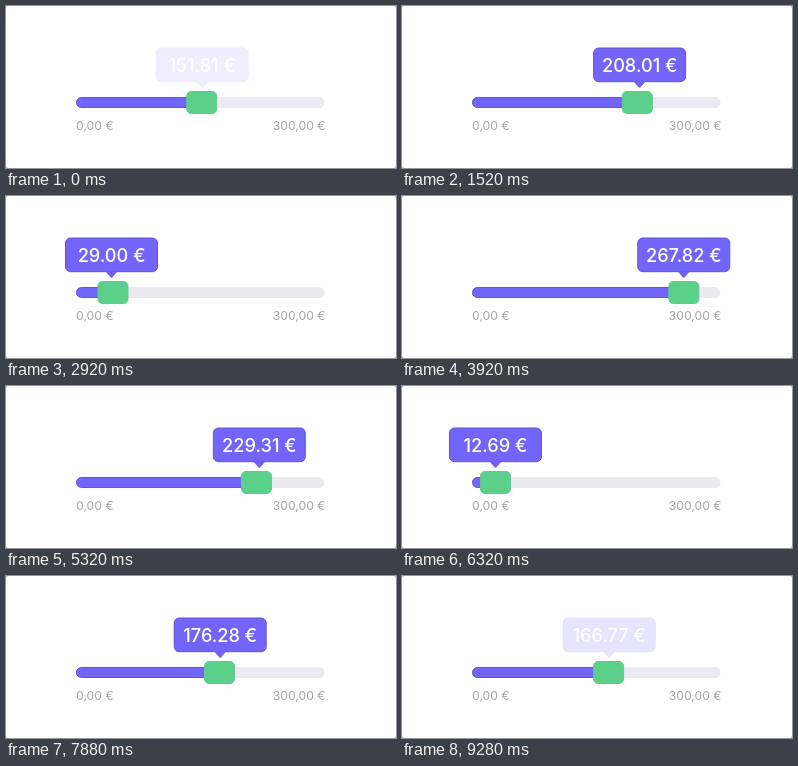
An HTML page that plays this animation: 390x162 px, repeating every 9.32 s.

```html
<!DOCTYPE html>
<html lang="en">
<head>
<meta charset="utf-8">
<title>Price slider</title>
<style>
  html, body { margin: 0; width: 100%; height: 100%; overflow: hidden; background: #999; }
  svg { display: block; width: 390px; height: 162px; background: #fff; border-radius: 2px; }
  text { font-family: Inter, sans-serif; }
  .label { font-size: 12.2px; fill: #a6a6aa; }
  .value { font-size: 18.2px; font-weight: 500; fill: #fff; text-anchor: middle; }
</style>
</head>
<body>
<svg viewBox="0 0 390 162">
  <rect x="70" y="91" width="248.5" height="11" rx="5.5" fill="#ebeaf1"/>
  <rect id="fill" x="70.5" y="91.5" height="10" rx="5" fill="#7365fa" stroke="#6155d0"/>
  <text class="label" x="70" y="124">0,00 €</text>
  <text class="label" x="319.5" y="124" text-anchor="end">300,00 €</text>
  <rect id="thumb" x="-15" y="85.5" width="30" height="22" rx="4.5" fill="#5bd08b" stroke="#68c690"/>
  <g id="bubble">
    <rect x="-46" y="42" width="92" height="33.7" rx="5" fill="#7365fa" stroke="#6257c6"/>
    <path d="M-6 75.5L-1 81.3Q0 82.4 1 81.3L6 75.5Z" fill="#7062ee"/>
    <text id="value" class="value" x="0" y="65.7"></text>
  </g>
</svg>
<script>
const LOOP = 9320, STEP = 300 / 662, START = 151.81;
const [fill, thumb, bubble, value] =
  ['fill', 'thumb', 'bubble', 'value'].map(id => document.getElementById(id));

// The slider is dragged from one resting value to the next
const drags = [
  { from: 500, to: 1110, value: 237.5 },
  { from: 1110, to: 2800, value: 24 },
  { from: 2800, to: 4240, value: 300 },
  { from: 4732, to: 6560, value: 0 },
  { from: 6880, to: 7880, value: 176.28 },
  { from: 7900, to: 8400, value: 151.81 },
  { from: 8400, to: 8930, value: 166.77 }
];

const ramp = (t, from, to) => Math.min(1, Math.max(0, (t - from) / (to - from)));
const ease = u => (1 - Math.cos(Math.PI * u)) / 2;

function valueAt(t) {
  const v = drags.reduce((v, d) => v + (d.value - v) * ease(ramp(t, d.from, d.to)), START);
  return Math.round(v / STEP) * STEP;
}

function draw(now) {
  const t = now % LOOP, v = valueAt(t);
  // The thumb runs slightly ahead of its bubble
  const thumbX = 85.2 + 0.728 * valueAt(t + 12);
  const alpha = 0.1 + 0.9 * (ramp(t, 440, 680) - ramp(t, 9000, 9304));
  fill.setAttribute('width', thumbX - 70);
  thumb.setAttribute('transform', `translate(${thumbX})`);
  bubble.setAttribute('transform', `translate(${84.1 + 0.738 * v})`);
  bubble.setAttribute('opacity', alpha);
  value.textContent = v.toFixed(2) + ' €';
}

const start = performance.now();
function frame() {
  draw(performance.now() - start);
  requestAnimationFrame(frame);
}
frame();
</script>
</body>
</html>
```
